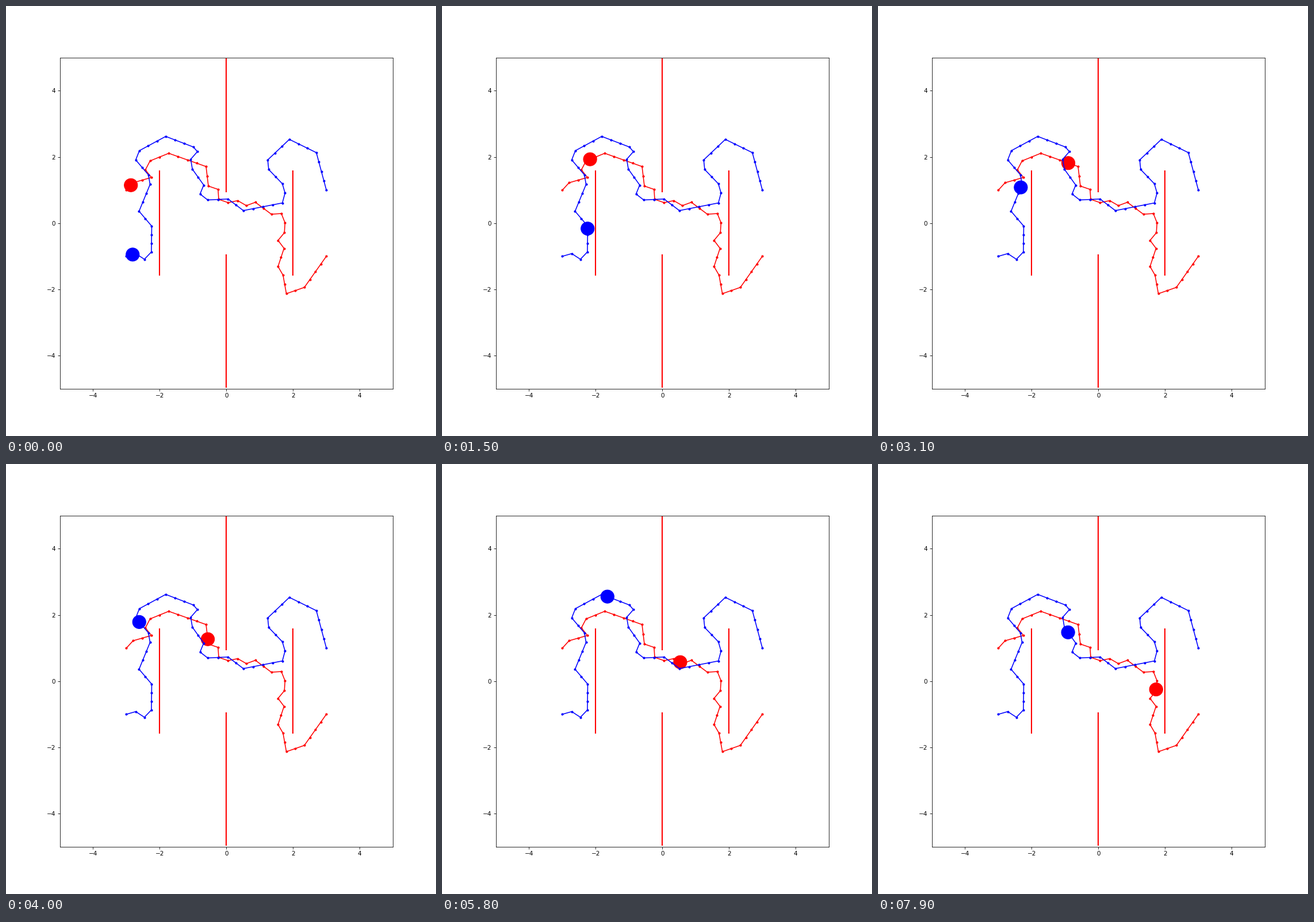
Recreate the animation shown at these times as a matplotlib script. Size 748 by 748 pixels, loop 8 s.

```python
import numpy as np
import matplotlib.pyplot as plt
from matplotlib.animation import FuncAnimation
from matplotlib.patches import Circle

FRAMES, INTERVAL = 80, 100
STEP = 0.3          # spacing of waypoints along a route
RADIUS = 0.2        # robot size
BLEND = 0.4         # corner smoothing, in waypoints
PACE_AT = [0, 8, 40, 79]

# Turning points of each route, and waypoints passed at the times above
ROBOTS = {
    "red": ([(-3, 1), (-2.8, 1.22), (-2.25, 1.38), (-2.43, 1.61),
             (-2.29, 1.88), (-1.73, 2.11), (-0.61, 1.71), (-0.54, 1.12),
             (-0.25, 1.02), (-0.23, 0.72), (0.05, 0.62), (0.34, 0.68),
             (0.6, 0.53), (0.87, 0.63), (1.35, 0.27), (1.65, 0.29),
             (1.76, 0.01), (1.74, -0.29), (1.55, -0.52), (1.73, -0.76),
             (1.55, -1.31), (1.7, -1.57), (1.8, -2.13), (2.34, -1.94),
             (3, -1)],
            [0.67, 3.45, 12.5, 23.88]),
    "blue": ([(-3, -1), (-2.72, -0.92), (-2.46, -1.09), (-2.25, -0.87),
              (-2.24, -0.09), (-2.62, 0.36), (-2.29, 1.17), (-2.34, 1.46),
              (-2.72, 1.91), (-2.61, 2.19), (-1.82, 2.62), (-0.99, 2.3),
              (-0.87, 2.16), (-1.07, 1.93), (-1.02, 1.63), (-0.68, 1.15),
              (-0.79, 0.88), (-0.56, 0.7), (0.05, 0.73), (0.51, 0.38),
              (1.68, 0.61), (1.76, 0.91), (1.68, 1.19), (1.27, 1.62),
              (1.24, 1.91), (1.89, 2.53), (2.7, 2.13), (3, 1)],
             [0.67, 3.55, 13.45, 24.65]),
}


def waypoints(turns):
    """Split each leg into equal steps of about STEP."""
    turns = np.array(turns, float)
    points = [turns[:1]]
    for a, b in zip(turns, turns[1:]):
        n = max(1, round(np.hypot(*(b - a)) / STEP))
        points.append(a + (b - a) * np.arange(1, n + 1)[:, None] / n)
    return np.vstack(points)


def drive(route, pace):
    """Position per step, averaged over nearby route to round the corners."""
    along = np.interp(np.arange(FRAMES), PACE_AT, pace)
    near = along[:, None] + np.linspace(-BLEND, BLEND, 9)
    index = np.arange(len(route))
    return np.column_stack(
        [np.interp(near, index, axis).mean(axis=1) for axis in route.T])


fig = plt.figure(figsize=(10, 10), dpi=74.8, facecolor="white")
ax = fig.add_subplot()
ax.set(xlim=(-5, 5), ylim=(-5, 5),
       xticks=range(-4, 5, 2), yticks=range(-4, 5, 2))

for x, low, high in [(-2, -1.593, 1.593), (2, -1.593, 1.593),
                     (0, 0.94, 4.97), (0, -4.97, -0.94)]:
    ax.plot([x, x], [low, high], color="red", lw=2,
            solid_capstyle="butt", zorder=1)

discs = []
for color, (turns, pace) in ROBOTS.items():
    route = waypoints(turns)
    ax.plot(*route.T, ".-", color=color)
    path = drive(route, pace)
    discs.append((ax.add_patch(Circle(path[0], RADIUS, color=color)), path))


def update(step):
    for disc, path in discs:
        disc.center = path[step]
    return [disc for disc, _ in discs]


anim = FuncAnimation(fig, update, frames=FRAMES, interval=INTERVAL,
                     repeat=True, repeat_delay=0)
plt.show()
```
